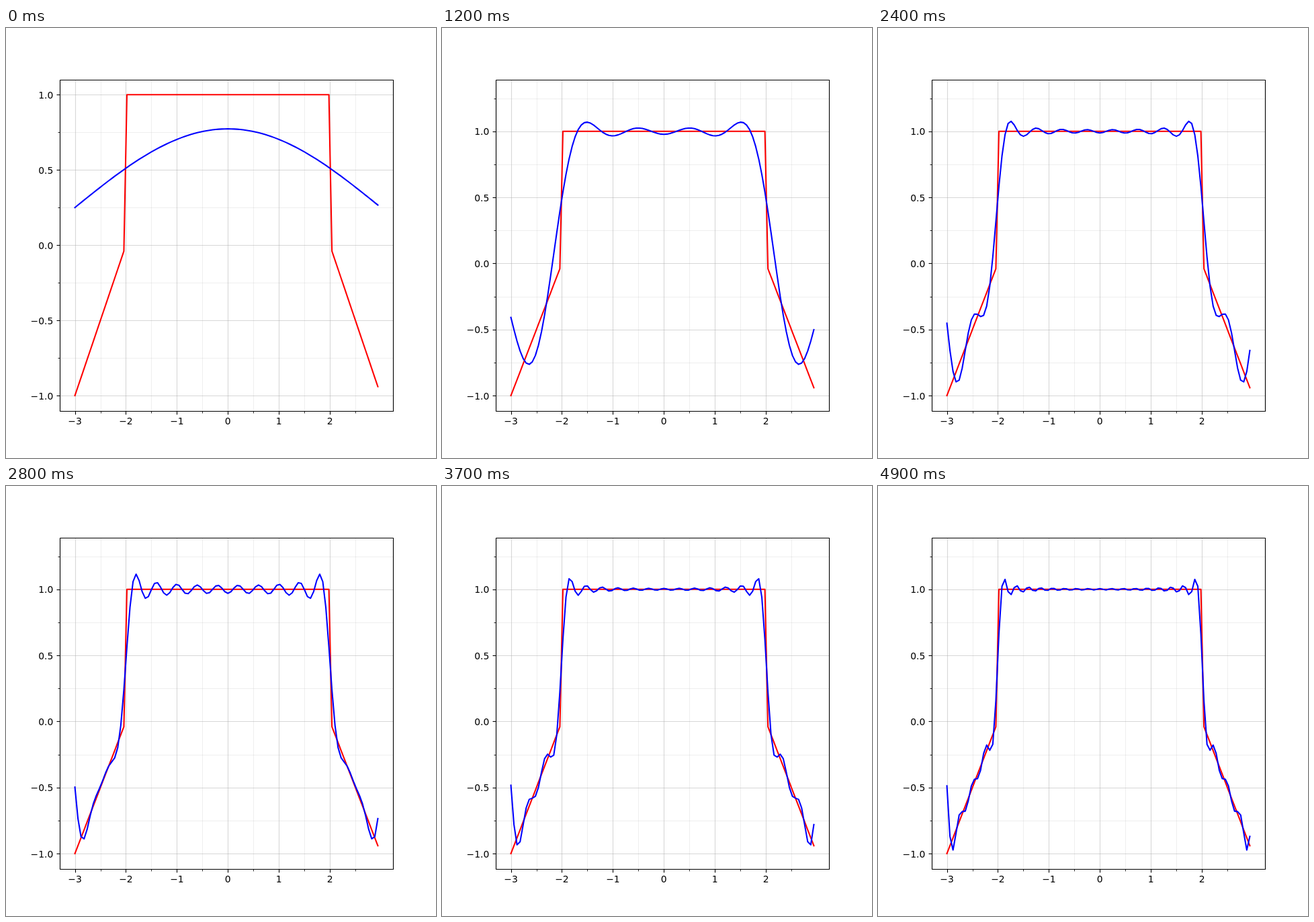
Animation, 640 px wide and 640 px high, one loop 5000 ms. Source, as an HTML page with a canvas:

```html
<!DOCTYPE html>
<html lang="en">
<head>
<meta charset="utf-8">
<title>Fourier partial sums</title>
<style>
  html, body { margin: 0; width: 100%; height: 100%; overflow: hidden; background: #fff; }
  canvas { display: block; }
</style>
</head>
<body>
<canvas id="stage" width="640" height="640"></canvas>
<script>
const ctx = document.getElementById('stage').getContext('2d');
const LEFT = 80, RIGHT = 576, TOP = 76.8, BOTTOM = 569.6;
const STEP_MS = 100, STEPS = 50;
const PT = 100 / 72; // one point at 100 dpi
const HALF_PERIOD = 6;

const xs = Array.from({ length: 100 }, (_, i) => -3 + i * 0.06);
const shape = x => Math.abs(x) < 2 ? 1 : 2 - Math.abs(x);
const target = xs.map(shape);

// Cosine coefficient of the shape, taken as zero outside [-3, 3].
function coefficient(n) {
  const w = n * Math.PI / HALF_PERIOD;
  const integral = (Math.sin(2 * w) - Math.sin(3 * w)) / w
    + (Math.cos(2 * w) - Math.cos(3 * w)) / (w * w);
  return 2 * integral / HALF_PERIOD;
}

// Each step adds one harmonic; the y range only ever grows.
const steps = [];
let sum = xs.map(() => 0.25), high = 1, low = -1;
for (let n = 1; n <= STEPS; n++) {
  const a = coefficient(n);
  sum = sum.map((y, i) => y + a * Math.cos(n * Math.PI * xs[i] / HALF_PERIOD));
  high = Math.max(high, ...sum);
  low = Math.min(low, ...sum);
  steps.push({ sum, high, low });
}

const scale = (min, max, from, to) => {
  const pad = (max - min) * 0.05;
  return v => from + (v - min + pad) / (max - min + 2 * pad) * (to - from);
};
const snap = v => Math.floor(v + 0.5) + 0.5;
const toX = scale(xs[0], xs[99], LEFT, RIGHT);

function line(x1, y1, x2, y2, width, color) {
  ctx.lineWidth = width * PT;
  ctx.strokeStyle = color;
  ctx.beginPath();
  ctx.moveTo(x1, y1);
  ctx.lineTo(x2, y2);
  ctx.stroke();
}

function curve(ys, toY, color) {
  ctx.lineWidth = 1.5 * PT;
  ctx.lineCap = 'square';
  ctx.lineJoin = 'round';
  ctx.strokeStyle = color;
  ctx.beginPath();
  ys.forEach((y, i) => ctx.lineTo(toX(xs[i]), toY(y)));
  ctx.stroke();
}

const gridColor = major => `rgba(176, 176, 176, ${major ? 0.5 : 0.2})`;
const label = (v, digits) => v.toFixed(digits).replace('-', '\u2212');

function draw({ sum, high, low }) {
  const toY = scale(low, high, BOTTOM, TOP);
  const left = snap(LEFT), right = snap(RIGHT), top = snap(TOP), bottom = snap(BOTTOM);
  const xTicks = [], yTicks = [];
  for (let i = -6; i <= 5; i++) xTicks.push({ v: i / 2, major: i % 2 === 0 });
  for (let i = -4; i <= 5; i++) {
    if (toY(i / 4) > TOP) yTicks.push({ v: i / 4, major: i % 2 === 0 });
  }

  ctx.fillStyle = '#fff';
  ctx.fillRect(0, 0, 640, 640);
  ctx.lineCap = 'butt';
  for (const { v, major } of xTicks) {
    const x = snap(toX(v));
    line(x, top, x, bottom, 0.8, gridColor(major));
  }
  for (const { v, major } of yTicks) {
    const y = snap(toY(v));
    line(left, y, right, y, 0.8, gridColor(major));
  }

  curve(target, toY, '#f00');
  curve(sum, toY, '#00f');

  ctx.lineCap = 'butt';
  ctx.fillStyle = '#000';
  ctx.font = `${10 * PT}px "DejaVu Sans", sans-serif`;
  ctx.textAlign = 'center';
  for (const { v, major } of xTicks) {
    const x = snap(toX(v));
    line(x, bottom, x, bottom + (major ? 5 : 3), major ? 0.8 : 0.6, '#000');
    if (major) ctx.fillText(label(v, 0), toX(v), 590);
  }
  ctx.textAlign = 'right';
  for (const { v, major } of yTicks) {
    const y = snap(toY(v));
    line(left, y, left - (major ? 5 : 3), y, major ? 0.8 : 0.6, '#000');
    if (major) ctx.fillText(label(v, 1), 70.3, Math.round(toY(v) + 5.4));
  }

  ctx.lineWidth = 0.8 * PT;
  ctx.strokeRect(left, top, right - left, bottom - top);
}

function tick() {
  draw(steps[Math.floor(performance.now() / STEP_MS) % STEPS]);
  requestAnimationFrame(tick);
}
tick();
</script>
</body>
</html>
```
